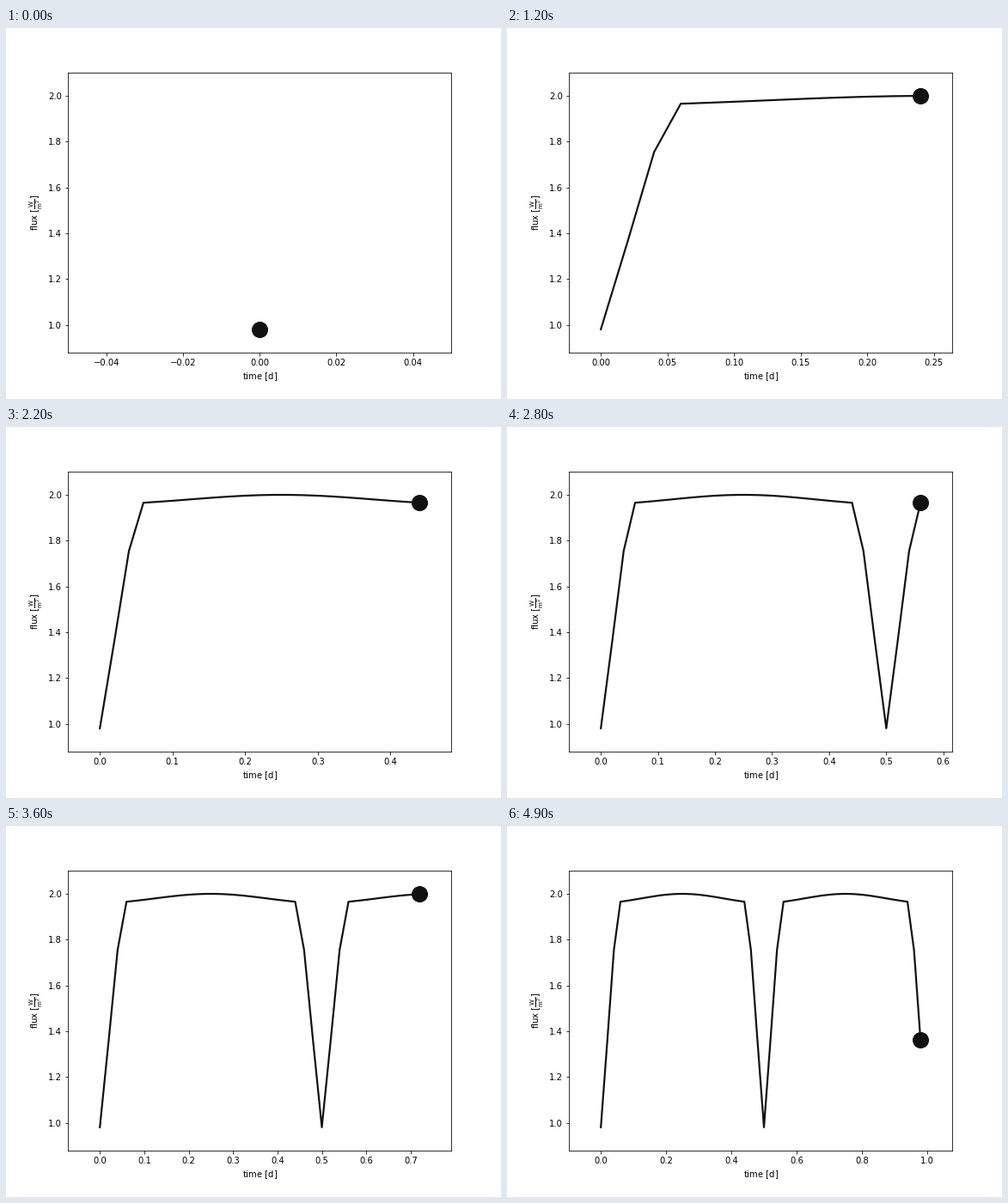
A matplotlib script that plays this animation: 576x432 px, repeating every 5 s.

```python
import numpy as np
import matplotlib.pyplot as plt
from matplotlib.animation import FuncAnimation

FRAMES = 50
STEP = 0.02          # days per frame
HALF_PERIOD = 0.5
PAD = 0.1
INK = "#111111"

plt.rcParams.update({"font.family": "DejaVu Sans", "font.size": 10})


def flux(t):
    """Light curve of two equal stars: tidal variation plus an eclipse dip."""
    phase = np.mod(t + 1e-9, HALF_PERIOD)
    distance = np.minimum(phase, HALF_PERIOD - phase)
    outside = 2 - 0.0395 * np.cos(2 * np.pi * t) ** 2
    eclipse = np.interp(distance, [0, 0.02, 0.04, 0.06],
                        [0.981, 1.362, 1.755, 1.9655])
    return np.where(distance < 0.061, eclipse, outside)


def padded(low, high):
    margin = PAD * (high - low)
    return low - margin, high + margin


times = np.arange(FRAMES) * STEP
values = flux(times)

fig, ax = plt.subplots(figsize=(8, 6), dpi=72)
fig.subplots_adjust(left=0.125, right=0.9, bottom=0.125, top=0.88)
ax.set_xlabel(r"time [$\mathrm{d}$]")
ax.set_ylabel(r"flux [$\mathrm{\frac{W}{m^{2}}}$]")
ax.set_ylim(*padded(values.min(), values.max()))

curve, = ax.plot([], [], color=INK, lw=2.2)
marker, = ax.plot([], [], "o", color=INK, ms=18, mew=1)


def update(i):
    curve.set_data(times[:i + 1], values[:i + 1])
    marker.set_data(times[i:i + 1], values[i:i + 1])
    ax.set_xlim(*(padded(0, times[i]) if i else (-0.05, 0.05)))
    return curve, marker


anim = FuncAnimation(fig, update, frames=FRAMES, interval=100,
                     repeat=True, repeat_delay=0)
plt.show()
```
